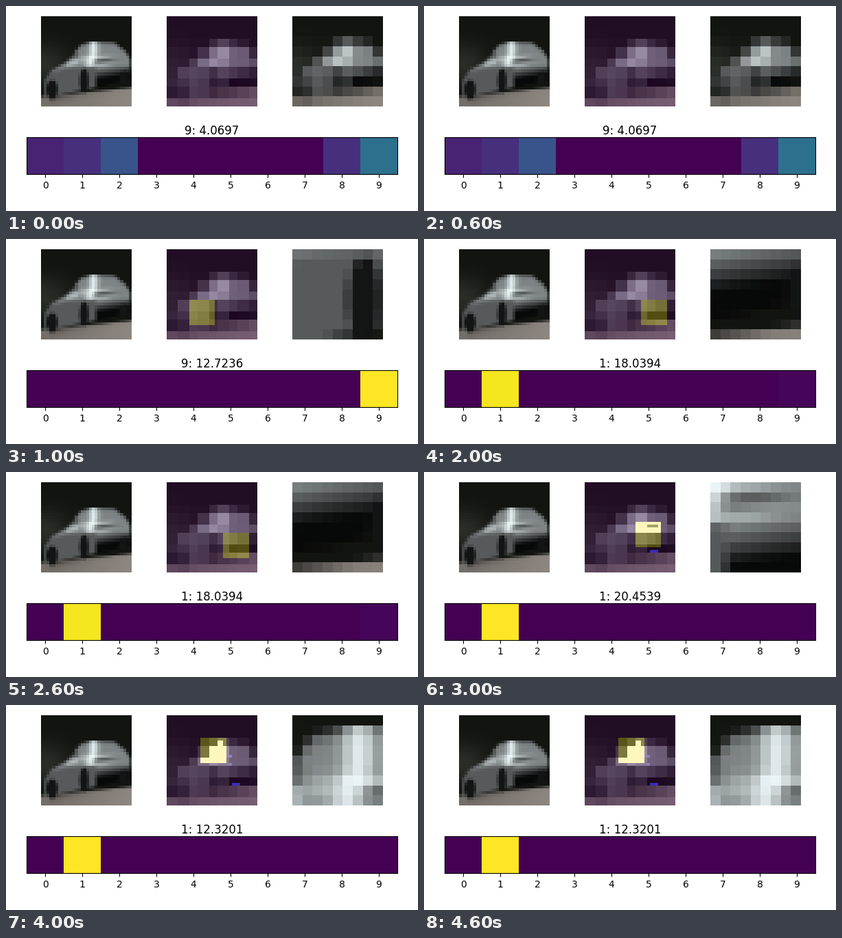
Write a matplotlib script that moves like this. It is 600 px wide and 300 px high and loops after 5000 ms.

```python
import numpy as np
import matplotlib.pyplot as plt
from matplotlib.animation import FuncAnimation
from matplotlib.gridspec import GridSpec

N, G = 32, 9          # picture and glimpse size in cells
S = N * G             # fine sampling grid, divisible by both


def bump(u, v=0):
    return np.exp(-u ** 2 - v ** 2)


def ramp(u):
    """Soft step from 0 to 1 around u = 0."""
    return 1 / (1 + np.exp(-np.clip(6 * u, -50, 50)))


def scene():
    """Soft picture of a silver car on a road, in N x N units."""
    c = (np.arange(S) + 0.5) / G
    x, y = np.meshgrid(c, c)

    # backdrop, then road with a shadow below the car
    back = 18 + 25 * bump((x - 1) / 9, (y - 17) / 7)
    img = back[..., None] + np.array([0, 2, -2])
    sill = 29.3 - 0.21 * x
    shadow = 1 - 0.55 * np.exp(-np.abs(y - sill)) * ramp(x - 3)
    road = ((112 + 0.8 * x) * shadow)[..., None] * np.array([1.03, 0.98, 0.94])
    img = np.where((y > 28.6 - 0.1 * x)[..., None], road, img)

    # car: lower side, upper body, shaded tail
    roof = np.interp(x, [1, 4, 10, 14, 18, 26, 30, 31.5],
                     [22, 19, 15.3, 10, 9, 9.2, 12.5, 15])
    car = (y > roof) & (y < sill) & (x > 1.3) & (x < 31.5)
    upper = ramp(18.2 - y) * ramp(x - 9)
    tail = ramp(x - 19.5) * ramp(y - 17.8)
    tone = 90 + 42 * upper
    tone += 50 * bump((y - 20.2 + 0.32 * x) / 1.1) * ramp(13 - x)      # hood
    tone += 105 * bump((x - 18.6 + 0.3 * np.maximum(y - 13, 0)) / 1.6) * ramp(17.6 - y)
    tone += 45 * bump((x - 15) / 2.5, (y - 15.3) / 1.4)                # shoulder
    tone -= 65 * bump((x - 12) / 1.2, (y - 14) / 0.9)                  # mirror
    tone -= 45 * bump((y - roof) / 0.9)                                # roof edge
    stripes = np.cos(2 * np.pi * (y - 14.4 + 0.08 * (x - 20)) / 3)
    tone += 55 * stripes * bump((x - 21.5) / 4) * ramp(y - 13.5) * ramp(18.5 - y)
    under = np.maximum(8, 140 - 32 * (y - 18) - 5 * (x - 21))
    tone = tone * (1 - tail) + under * tail
    for cx, cy, rx, ry in [(3.9, 26, 1.9, 3.4), (15.2, 23, 1.6, 4.4), (29.2, 22.3, 1.6, 2.8)]:
        wheel = ((x - cx) / rx) ** 2 + ((y - cy) / ry) ** 2 < 1
        tone[wheel] = 20
        car |= wheel
    paint = np.clip(tone, 5, 245)[..., None] * np.array([0.96, 1, 1.01])
    return np.where(car[..., None], paint, img)


def pool(img, n):
    k = S // n
    return img.reshape(n, k, n, k, 3).mean(axis=(1, 3))


fine = scene()
photo, coarse = pool(fine, N), pool(fine, G)
near = np.arange(N) * G // N
blurred = coarse[near][:, near]
bright = (photo + blurred).mean(axis=2) > 250
crisp = bright & ((photo - blurred).mean(axis=2) > 25)

viridis = plt.get_cmap("viridis")
LOW, HIGH = (np.array(viridis(v)[:3]) * 255 for v in (0.0, 1.0))
PALE, BLUE = (175, 185, 245), (60, 60, 220)

# window corner, title, class scores
STEPS = [
    (None, "9: 4.0697", {0: .1, 1: .14, 2: .26, 8: .14, 9: .37}),
    ((8, 18), "9: 12.7236", {9: 1}),
    ((20, 18), "1: 18.0394", {1: .985, 9: .015}),
    ((18, 14), "1: 20.4539", {1: 1}),
    ((12, 8), "1: 12.3201", {1: 1}),
]


def window(i):
    x, y = STEPS[i][0]
    return np.s_[y:y + G, x:x + G]


def views(i):
    """Tinted overview and glimpse for one step."""
    base = blurred.copy()
    tint = np.tile(LOW, (N, N, 1))
    if i == 0:
        return 0.7 * base + 0.3 * tint, coarse
    for k in range(1, i):              # traces of earlier glimpses
        base[window(k)][crisp[window(k)]] = PALE
    if i > 2:
        base[24, 23:26] = BLUE
    win = window(i)
    base[win] = blurred[win]
    base[win][bright[win]] = 255
    tint[win] = HIGH
    return 0.7 * base + 0.3 * tint, photo[win]


def to_rgb(a):
    return np.clip(a, 0, 255).astype(np.uint8)


fig = plt.figure(figsize=(6, 3), dpi=100, facecolor="white")
grid = GridSpec(2, 3, figure=fig, left=0.05, right=0.95, bottom=0.05, top=0.95,
                wspace=0.05, hspace=0.05)


def panel(col, img):
    ax = fig.add_subplot(grid[0, col])
    ax.axis("off")
    return ax.imshow(to_rgb(img), interpolation="nearest")


overview, glimpse = views(0)
panel(0, photo)
mid = panel(1, overview)
right = panel(2, glimpse)

bar_ax = fig.add_subplot(grid[1, :])
bar = bar_ax.imshow(np.zeros((1, 10)), vmin=0, vmax=1, interpolation="nearest")
bar_ax.set_xticks(range(10))
bar_ax.set_yticks([])
title = bar_ax.set_title("", fontsize=12, pad=2)


def update(i):
    _, text, scores = STEPS[i]
    overview, glimpse = views(i)
    mid.set_data(to_rgb(overview))
    right.set_data(to_rgb(glimpse))
    bar.set_data([[scores.get(k, 0) for k in range(10)]])
    title.set_text(text)
    return mid, right, bar, title


anim = FuncAnimation(fig, update, frames=len(STEPS), interval=1000,
                     repeat=True, repeat_delay=0, blit=False)
plt.show()
```
